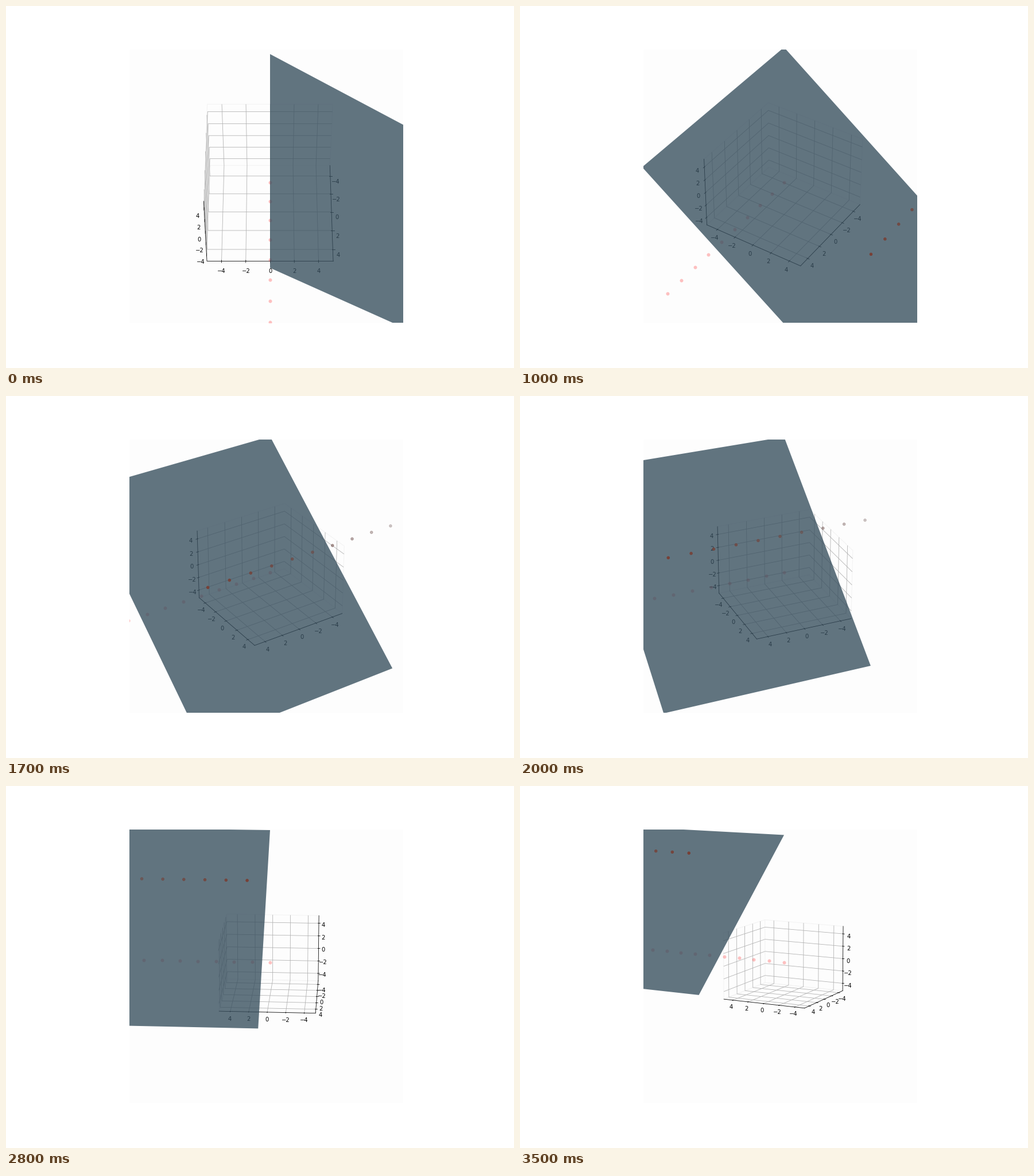
Write a matplotlib script that moves like this. It is 885 px wide and 632 px high and loops after 3.6 s.

```python
import numpy as np
import matplotlib.pyplot as plt
from matplotlib.animation import FuncAnimation
from mpl_toolkits.mplot3d.art3d import Poly3DCollection

WIDTH, HEIGHT, DPI = 885, 632, 72
FRAMES, INTERVAL = 36, 100
LIMIT = 5 + 10 / 48
NEAR = np.array([120, 64, 54]) / 255
FAR = np.array([105, 80, 78]) / 255

plt.rcParams.update({"font.family": "DejaVu Sans", "font.size": 10})
fig = plt.figure(figsize=(WIDTH / DPI, HEIGHT / DPI), dpi=DPI, facecolor="white")
fig.subplots_adjust(left=0.125, right=0.9, bottom=0.125, top=0.88)
ax = fig.add_subplot(projection="3d", facecolor="#fdfdfd", computed_zorder=False)

# two rows of points, separated by the plane y + z = 20
low_x = np.arange(0, 20, 2)
high_x = low_x + 1
ax.scatter(low_x, 0 * low_x, 0 * low_x, s=36, color=(1, 0, 0, 0.24),
           linewidths=0, depthshade=False, zorder=1)
high = ax.scatter(high_x, 0 * high_x + 20, 0 * high_x + 20, s=20,
                  color=NEAR, depthshade=False, zorder=3)

corners = [(0, 0, 20), (20, 0, 20), (20, 20, 0), (0, 20, 0)]
plane = Poly3DCollection([corners], facecolors=[(0.206, 0.301, 0.362, 0.78)],
                         edgecolors="none", zorder=2)
ax.add_collection3d(plane)

for set_lim in (ax.set_xlim, ax.set_ylim, ax.set_zlim):
    set_lim(-LIMIT, LIMIT, view_margin=0)
for axis in (ax.xaxis, ax.yaxis, ax.zaxis):
    axis.set_ticks(range(-4, 5, 2))
    axis.pane.set_alpha(None)
    axis.pane.set_fill(False)
    axis.pane.set_edgecolor("#f3f3f3")


def shade(azim):
    """Fade the upper row from opaque (near) to pale (far)."""
    depth = high_x * np.cos(np.radians(azim))
    near = ((depth - depth.min()) / np.ptp(depth))[:, None]
    rgb = FAR + (NEAR - FAR) * near
    return np.hstack([rgb, 0.3 + 0.7 * near])


def update(i):
    t = i / FRAMES
    azim = 120 * t
    ax.view_init(elev=50 - 40 * t, azim=azim)
    ax.set_box_aspect((4, 4, 3), zoom=10 / (14 + 6 * t))
    high.set_color(shade(azim))
    return []


anim = FuncAnimation(fig, update, frames=FRAMES, interval=INTERVAL,
                     init_func=lambda: update(0), repeat=True, repeat_delay=0)
plt.show()
```
